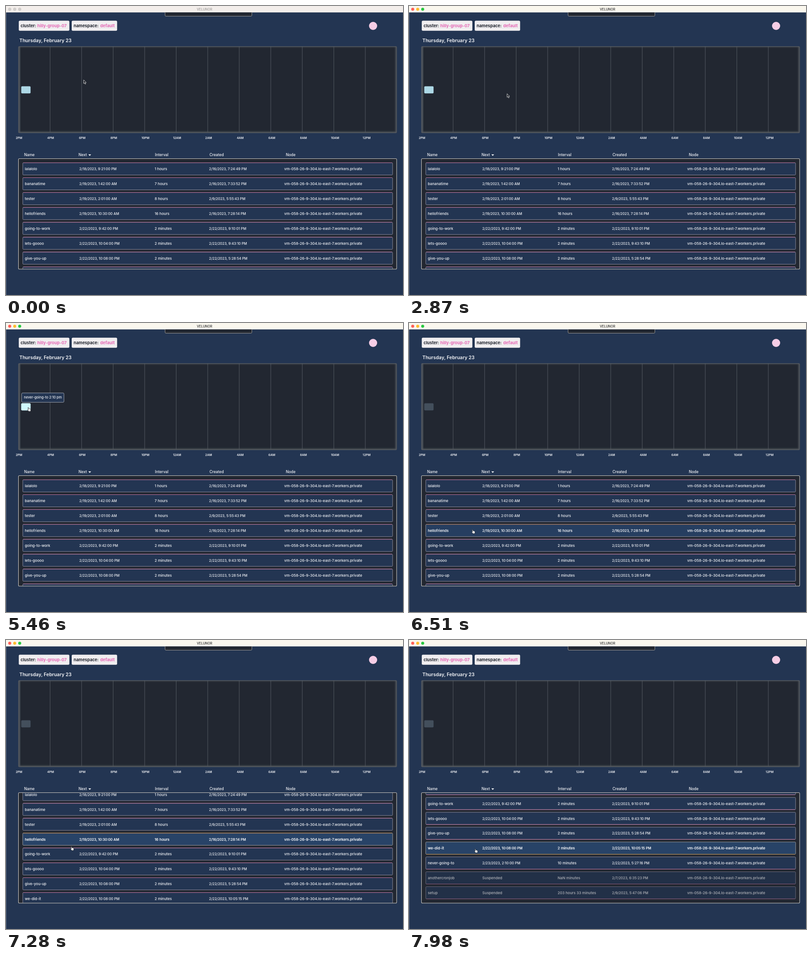
Write an HTML page that moves like this. It is 876x639 px and loops after 8000 ms.

```html
<!DOCTYPE html>
<html lang="en">
<head>
<meta charset="utf-8">
<title>Job schedule</title>
<style>
html, body { margin: 0; width: 100%; height: 100%; overflow: hidden; background: #233552; }
svg { display: block; width: 100vw; height: 100vh; }
text { font-family: Inter, "Open Sans", sans-serif; font-weight: 500; fill: #f4f5f8; white-space: pre; }
</style>
</head>
<body>
<svg id="stage" viewBox="0 0 876 639">
  <defs>
    <clipPath id="listClip"><rect x="28" y="338" width="834" height="243.5"/></clipPath>
    <clipPath id="chartClip"><rect x="27" y="89" width="835.5" height="192" rx="2"/></clipPath>
    <filter id="soft" x="-5%" y="-5%" width="110%" height="110%"><feGaussianBlur stdDeviation="1.6"/></filter>
  </defs>
</svg>
<script>
const LOOP = 8000, STEP = 70, PITCH = 32.9, MAX_SCROLL = 130.2;
const stage = document.getElementById('stage');

function add(parent, tag, attrs, text) {
  const el = document.createElementNS('http://www.w3.org/2000/svg', tag);
  for (const k in attrs) el.setAttribute(k, attrs[k]);
  if (text !== undefined) el.textContent = text;
  parent.appendChild(el);
  return el;
}
const box = (parent, x, y, width, height, attrs) =>
  add(parent, 'rect', { x, y, width, height, ...attrs });
const label = (parent, x, y, size, text, attrs) =>
  add(parent, 'text', { x, y, 'font-size': size, ...attrs }, text);
const set = (el, name, value) => el.setAttribute(name, value);

// Page and window bar
box(stage, 0, 0, 876, 639, { fill: '#233552' });
box(stage, 0, 14, 1, 625, { fill: '#5b6880' });
const bar = box(stage, 0, 0, 876, 14.2, {});
const lights = [0, 1, 2].map(i =>
  add(stage, 'circle', { cx: 8.2 + 11 * i, cy: 7.1, r: 3.2, 'stroke-width': 0.4 }));
const title = label(stage, 438, 9.6, 7.1, 'VELUNOR', { 'text-anchor': 'middle', style: 'font-weight:600' });
add(stage, 'path', {
  d: 'M351 14.2V20.5Q351 22.5 353 22.5H540.5Q542.5 22.5 542.5 20.5V14.2',
  fill: '#222731', stroke: '#a8a49e', 'stroke-width': 0.9
});

// Header
function badge(x, width, key, keyX, value, valueX) {
  box(stage, x, 32.4, width, 22.4, { rx: 2.5, fill: '#f0eef0' });
  label(stage, keyX, 46.7, 9.2, key, { style: 'font-weight:700;fill:#20242e' });
  label(stage, valueX, 46.7, 9.2, value, { style: 'font-weight:700;fill:#e467b4' });
}
badge(28.2, 111.6, 'cluster:', 32.2, 'hilly-group-07', 69);
badge(145, 100.2, 'namespace:', 149.2, 'default', 208);
add(stage, 'circle', { cx: 810, cy: 44, r: 9, fill: '#f6cde5' });
label(stage, 29.5, 79.6, 10.5, 'Thursday, February 23', { style: 'font-weight:600' });

// Timeline chart
const chart = add(stage, 'g', { 'clip-path': 'url(#chartClip)' });
box(chart, 27, 89, 836, 193, { fill: '#222731' });
box(chart, 28, 88.5, 833.5, 191.5, { fill: 'none', stroke: '#50545b', 'stroke-width': 4.5, filter: 'url(#soft)' });
box(chart, 27.5, 89.5, 834.5, 191, { fill: 'none', stroke: '#5c6067', 'stroke-width': 0.9, rx: 2 });
for (let i = 0; i < 12; i++) {
  const x = i ? 97.3 + (i - 1) * 69.56 : 30.5;
  add(chart, 'path', { d: `M${x} 90V279`, stroke: '#5b6068', 'stroke-width': 0.9 });
  const hour = (2 * i + 1) % 12 + 1;
  label(stage, 28.7 + i * 69.73, 294.3, 6.6, hour + (i < 5 || i === 11 ? 'PM' : 'AM'),
    { 'text-anchor': 'middle', style: 'font-weight:600' });
}
const jobBox = fill => box(stage, 33.6, 177.4, 20.6, 15.8, { rx: 2, fill });
const dimJob = jobBox('#434f5c');
const plainJob = jobBox('#add8e6');
const litJob = jobBox('#cff8fd');
const tip = add(stage, 'g', {});
box(tip, 34.5, 154.7, 93.4, 20.6, { rx: 2, fill: '#233552', stroke: '#aeb3bc', 'stroke-width': 0.9 });
label(tip, 39.5, 167.4, 7.45, 'never-going-to 2:10 pm');

// Table
[[40, 'Name'], [160, 'Next'], [328.7, 'Interval'], [449, 'Created'], [617.5, 'Node']]
  .forEach(([x, s]) => label(stage, x, 332.2, 8.3, s));
add(stage, 'path', { d: 'M181.8 328H187.8L184.8 331.4Z', fill: '#f4f5f8' });
const panel = attrs => box(stage, 27.5, 337.5, 834.5, 244.2, { rx: 2, ...attrs });
panel({ fill: '#222731' });

const NODE = 'vm-058-26-9-304.lo-east-7.workers.private';
const jobs = [
  ['lalalolo', '2/18/2023, 9:21:00 PM', '1 hours', '2/16/2023, 7:24:49 PM'],
  ['bananatime', '2/19/2023, 1:42:00 AM', '7 hours', '2/16/2023, 7:33:52 PM'],
  ['tester', '2/19/2023, 2:01:00 AM', '8 hours', '2/9/2023, 5:55:43 PM'],
  ['hellofriends', '2/19/2023, 10:30:00 AM', '16 hours', '2/16/2023, 7:28:14 PM'],
  ['going-to-work', '2/22/2023, 9:42:00 PM', '2 minutes', '2/22/2023, 9:10:01 PM'],
  ['lets-goooo', '2/22/2023, 10:04:00 PM', '2 minutes', '2/22/2023, 9:43:10 PM'],
  ['give-you-up', '2/22/2023, 10:08:00 PM', '2 minutes', '2/22/2023, 5:28:54 PM'],
  ['we-did-it', '2/22/2023, 10:08:00 PM', '2 minutes', '2/22/2023, 10:05:15 PM'],
  ['never-going-to', '2/23/2023, 2:10:00 PM', '10 minutes', '2/22/2023, 5:27:16 PM'],
  ['anothercronjob', 'Suspended', 'NaN minutes', '2/7/2023, 6:35:23 PM'],
  ['setup', 'Suspended', '203 hours 33 minutes', '2/9/2023, 5:47:06 PM']
];
const COLUMNS = [41.5, 161.8, 328, 448, 614];
const list = add(add(stage, 'g', { 'clip-path': 'url(#listClip)' }), 'g', {});
const rows = jobs.map((job, i) => {
  const off = job[1] === 'Suspended';
  const g = add(list, 'g', { transform: `translate(0 ${346.6 + i * PITCH})`, opacity: off ? 0.68 : 1 });
  const frame = (fill, stroke) => box(g, 37, 0, 816, 27, { rx: 1.5, fill, stroke, 'stroke-width': 0.9 });
  const edge = stroke => add(g, 'path', { d: 'M38 0H852', stroke, 'stroke-width': 0.9 });
  frame('#233552', '#9695a5');
  const glow = frame('#284367', '#8c8d8c');
  const pink = edge('#c671a0'), gold = edge('#9c862c');
  const cells = add(g, 'g', { stroke: '#fff', 'stroke-width': 0 });
  [...job, NODE].forEach((s, c) =>
    label(cells, COLUMNS[c], 16.7, s.includes('/') ? 7.6 : 8.1, s));
  return { glow, pink, gold, cells };
});
panel({ fill: 'none', stroke: '#cbc7c0', 'stroke-width': 1.1 });

// Pointers, placed by their upper left corner
const arrow = add(stage, 'path', {
  d: 'M.4 .5V8.3L2.2 6.7L3.5 9.7L5 9.1L3.7 6.2H6.1Z',
  fill: '#15181f', stroke: '#f2f2f2', 'stroke-width': 0.8, 'stroke-linejoin': 'round'
});
const hand = add(stage, 'path', {
  d: 'M1.2 1Q1.9 .1 2.6 1L3.5 3.6Q4.3 3 4.9 3.7Q5.7 3.2 6.2 4Q7 3.8 7.3 4.8L7.5 7L6.8 9.4H3.2L.6 6.2Q.3 5.3 1.3 5.3L2.2 5.8Z',
  fill: '#fff', stroke: '#14171d', 'stroke-width': 0.7, 'stroke-linejoin': 'round'
});

const clamp = v => Math.max(0, Math.min(1, v));
const ease = u => u * u * (3 - 2 * u);
const within = (t, a, b) => t >= a && t < b;
// Fades in from a and out from b
const fade = (t, a, b, rise) => clamp((t - a + STEP) / rise) * clamp(1 - (t - b + STEP) / 140);

// Pointer moves: start, end, place reached
const moves = [
  [0, 840, 49.5, 184.5], [840, 1330, 38.5, 187], [1400, 1540, 45.7, 186.7],
  [2170, 2520, 216, 193.5], [3080, 3220, 220.5, 195], [3570, 4550, 47.5, 186],
  [5320, 6090, 43, 187], [6160, 6510, 138, 456.3], [6510, 6930, 142, 456], [7700, 7980, 144, 461.2]
];
function pointer(t) {
  let x = 171, y = 163;
  for (const [a, b, toX, toY] of moves) {
    const u = ease(clamp((t - a) / (b - a)));
    x += (toX - x) * u;
    y += (toY - y) * u;
  }
  return [x, y];
}
// S-curve that reaches both ends exactly
const scrolled = t => MAX_SCROLL * clamp(1.034 / (1 + Math.exp((7385 - t) / 61)) - 0.015);

function draw(time) {
  const t = Math.floor(time / STEP) * STEP;
  const active = t >= 1190;
  set(bar, 'fill', active ? '#faf7ee' : '#f3eeeb');
  title.style.fill = active ? '#484848' : '#a9a6a4';
  ['#ff5f57', '#febc2e', '#28c840'].forEach((c, i) => {
    set(lights[i], 'fill', active ? c : '#d3cfcd');
    set(lights[i], 'stroke', active ? c : '#b9b5b3');
  });

  const lit = Math.max(fade(t, 1190, 2240, 210), fade(t, 4480, 6230, 210));
  const rowHover = t >= 6440;
  set(litJob, 'opacity', lit);
  set(tip, 'opacity', lit);
  set(plainJob, 'opacity', rowHover ? 0 : 1);
  set(dimJob, 'opacity', rowHover ? 1 : 0);

  const top = scrolled(t);
  set(list, 'transform', `translate(0 ${-top})`);
  const edgeY = top < 50 ? 0 : 27;
  rows.forEach((r, i) => {
    const on = i === 3 ? fade(t, 6440, 7770, 210) : i === 7 ? fade(t, 7770, LOOP + 200, 140) : 0;
    set(r.glow, 'opacity', on);
    set(r.gold, 'opacity', on);
    set(r.cells, 'stroke-width', 0.2 * on);
    for (const e of [r.pink, r.gold]) set(e, 'transform', `translate(0 ${edgeY})`);
  });

  const pointing = within(t, 1190, 2240) || within(t, 4480, 6230) || rowHover;
  const [x, y] = pointer(t);
  for (const p of [arrow, hand]) set(p, 'transform', `translate(${x} ${y})`);
  set(arrow, 'visibility', pointing ? 'hidden' : 'visible');
  set(hand, 'visibility', pointing ? 'visible' : 'hidden');
}

const start = performance.now();
function tick() {
  draw((performance.now() - start) % LOOP);
  requestAnimationFrame(tick);
}
tick();
</script>
</body>
</html>
```
